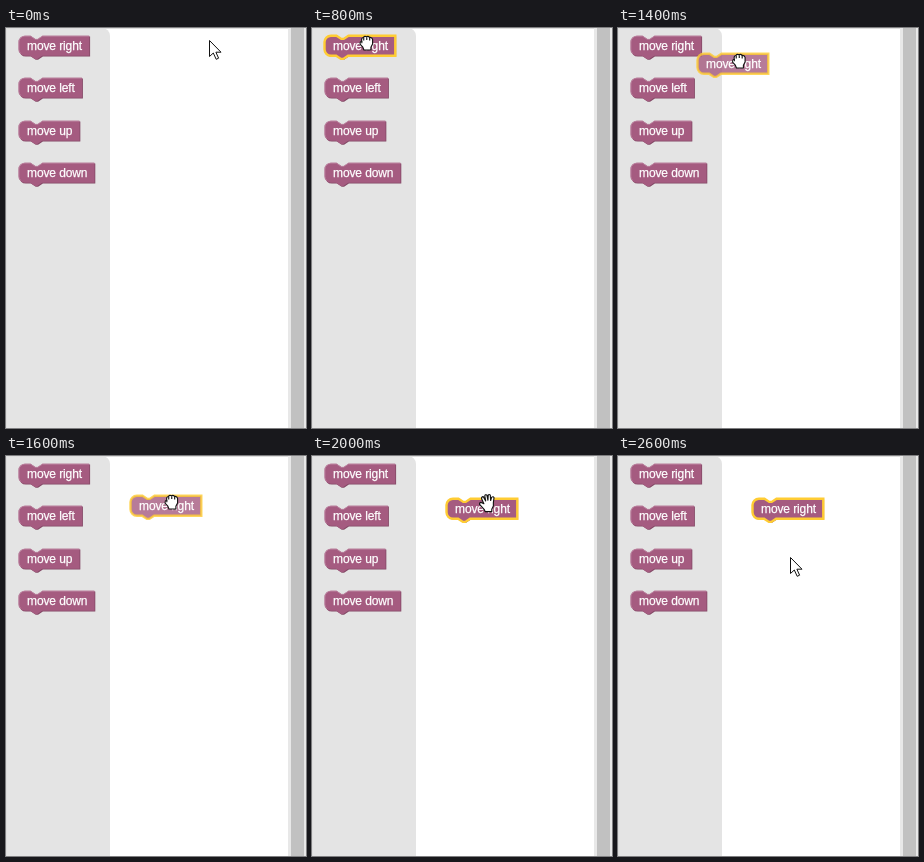
Write an HTML page that moves like this. It is 300 by 400 pixels and loops after 3200 ms.

```html
<!DOCTYPE html>
<html lang="en">
<head>
<meta charset="utf-8">
<title>Dragging a block</title>
<style>
  html, body { margin: 0; width: 100%; height: 100%; overflow: hidden; background: #fff; }
  svg { display: block; }
  text {
    font: 12px "Liberation Sans", Arial, sans-serif; letter-spacing: -.11px;
    fill: #fff; stroke: #fff; stroke-width: .25;
  }
  .body { fill: #a55b80; }
  .shade { fill: #844966; }
  .light { fill: none; stroke: #c08ca6; }
  .selected .body { stroke: #fc3; stroke-width: 3; }
  .selected .light, .dragging .shade { display: none; }
  .dragging .body { fill-opacity: .8; stroke-opacity: .8; }
  .cursor { fill: #fff; stroke: #111; stroke-width: 1; stroke-linejoin: round; }
  .cursor .crease { fill: none; }
  .cursor .cross { stroke: #e22; stroke-width: 2; }
</style>
</head>
<body>
<svg width="300" height="400" viewBox="0 0 300 400">
  <rect width="300" height="400" fill="#fff"/>
  <path d="M0 0H96A8 8 0 0 1 104 8V400H0Z" fill="#e4e4e4"/>
  <path d="M.5 400V.5H283" fill="none" stroke="#ddd"/>
  <rect x="282" width="18" height="400" fill="#e8e8e8"/>
  <rect x="285" width="13" height="400" fill="#c1c1c1"/>
  <g id="blocks"></g>
  <g id="arrow" class="cursor">
    <path d="M.5 .5V16.5L4.3 13L7.2 19.3L9.6 18.2L6.9 12.2H12Z"/>
  </g>
  <g id="fist" class="cursor">
    <g transform="translate(-1.2 -1.2) scale(1.12)">
      <path d="M3.5 6.5Q3 3.6 5 3.3Q6 1.8 7.8 2.7Q9.2 1.8 10.5 3.2Q12.7 2.8 13.2 5V9L11.7 12V14.5H5.5L4.5 12L2 9.2Q1.8 7 3.5 6.5Z"/>
      <path class="crease" d="M5.3 3.5V6M8 3V5.6M10.6 3.4V6M3.6 6.5V8.5"/>
    </g>
    <path id="cross" class="cross" d="M9.5 11.5L15.5 17.5M15.5 11.5L9.5 17.5"/>
  </g>
  <g id="palm" class="cursor">
    <path transform="scale(1.13)" d="M5.2 9L3.2 4.6Q3 2.6 4.7 2.8L6.8 6.6L6 2.3Q6.3 .5 7.9 1.4L8.8 6L9 1.6Q9.8 .2 10.9 1.5L11.2 6.2L12 3.4Q13.4 2.2 14.2 3.7L13.6 8V11L12.2 14V16H6.3L5.4 14L1.4 9.6Q1.2 7.8 2.8 7.9Z"/>
  </g>
</svg>
<script>
const LOOP = 3200;
const SCALE = 0.8;
const byId = id => document.getElementById(id);
const blocks = byId("blocks");

// Label widths are in block units, before scaling.
const labels = [["move right", 68.5], ["move left", 59.5], ["move up", 56.3], ["move down", 75]];

function addBlock([label, labelWidth], row) {
  const w = labelWidth + 20;
  const outline = `M0 8A8 8 0 0 1 8 0H15l6 4h3l6 -4H${w}V25H29.5l-6 4h-3l-6 -4H8a8 8 0 0 1 -8 -8Z`;
  const edge = `M2.7 22.3A7.5 7.5 0 0 1 .5 17V8A7.5 7.5 0 0 1 8 .5H15l6 4h3l6 -4H${w - .5}`;
  const block = document.createElementNS("http://www.w3.org/2000/svg", "g");
  block.innerHTML = `<g transform="scale(${SCALE})">
      <path class="shade" transform="translate(1 1)" d="${outline}"/>
      <path class="body" d="${outline}"/><path class="light" d="${edge}"/>
    </g><text x="8.5" y="14.3">${label}</text>`;
  blocks.append(block);
  place(block, 0, Math.round(row * 42.4));
  return block;
}

function place(block, dx, dy) {
  block.setAttribute("transform", `translate(${12.5 + dx} ${7.7 + dy})`);
}

const source = labels.map(addBlock)[0];
const copy = addBlock(labels[0], 0);

// time, cursor, x, y
const pointer = [
  [0, "arrow", 203, 12], [100, "arrow", 190, 12], [200, "arrow", 148, 12],
  [300, "arrow", 98, 12], [400, "arrow", 69, 12], [500, "arrow", 65, 12],
  [600, "arrow", 63, 12], [700, "arrow", 57, 12], [800, "fist", 47, 7],
  [1200, "fist", 73, 16], [1300, "fist", 93, 20], [1400, "fist", 113.5, 25],
  [1500, "fist", 137, 31], [1600, "fist", 158, 38], [1700, "fist", 168, 41],
  [2000, "palm", 166, 37.5], [2100, "palm", 166, 40], [2200, "arrow", 173, 62],
  [2300, "arrow", 172, 78], [2400, "arrow", 172, 91], [2500, "arrow", 172, 98],
  [2600, "arrow", 172, 101]
];

// time, offset from the palette
const drag = [
  [1200, 25, 8], [1300, 46, 13], [1400, 67, 18],
  [1500, 90, 25], [1600, 112, 32], [1700, 122, 35]
];

const stepAt = (steps, t) => steps.findLast(step => step[0] <= t);
const show = (el, on) => el.style.display = on ? "" : "none";

function draw(t) {
  const [, kind, x, y] = stepAt(pointer, t);
  for (const id of ["arrow", "fist", "palm"]) show(byId(id), id === kind);
  byId(kind).setAttribute("transform", `translate(${x} ${y})`);
  show(byId("cross"), t >= 1200 && t < 1400);

  source.classList.toggle("selected", t >= 400 && t < 1200);
  const offset = stepAt(drag, t);
  show(copy, offset);
  if (offset) place(copy, offset[1], offset[2]);
  copy.setAttribute("class", t < 1800 ? "selected dragging" : "selected");
}

const start = performance.now();
function tick() {
  draw((performance.now() - start) % LOOP);
  requestAnimationFrame(tick);
}
tick();
</script>
</body>
</html>
```
